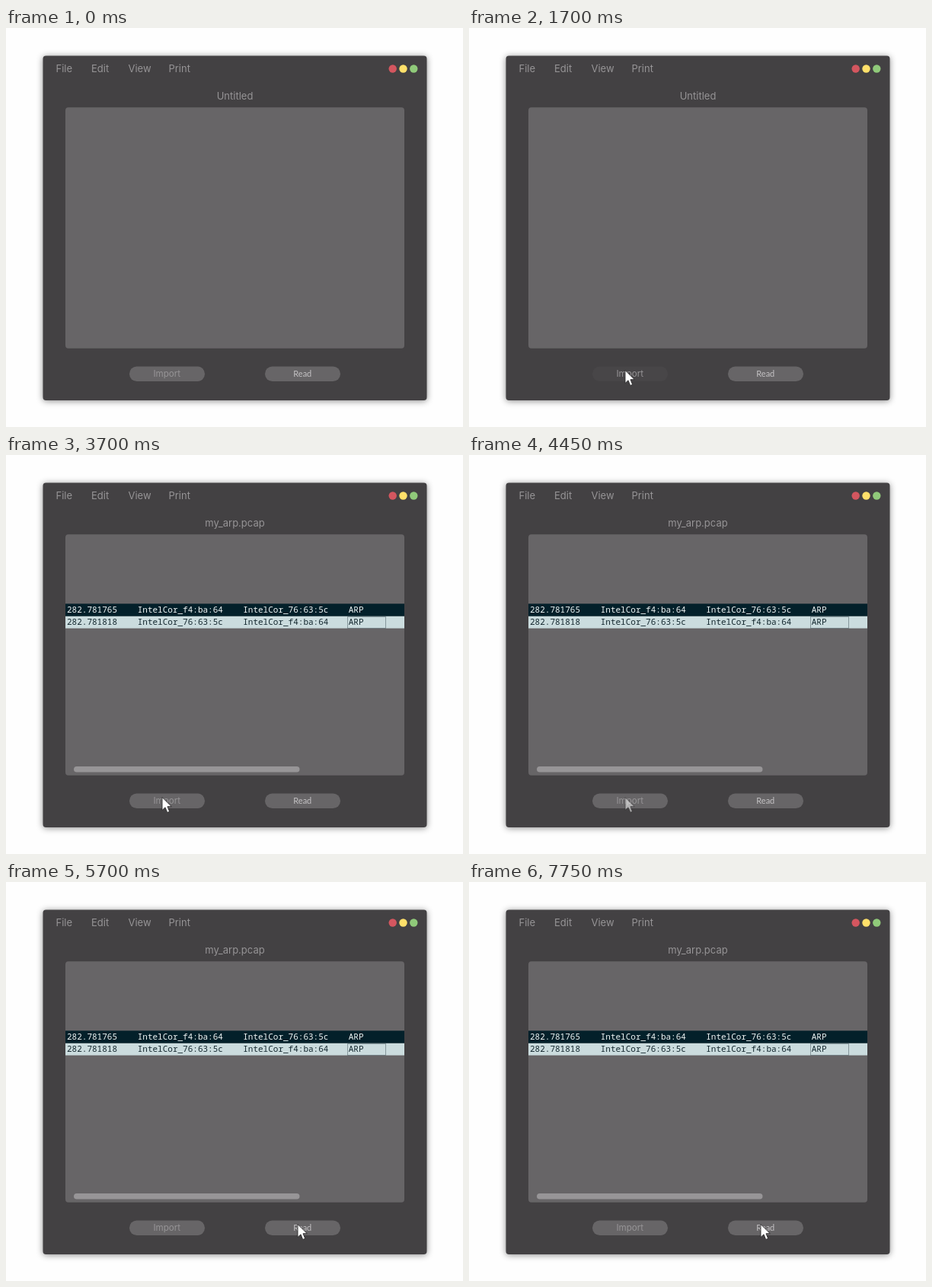
An HTML page for the animation above (8000 ms loop, 600 by 524 pixels).

```html
<!DOCTYPE html>
<html lang="en">
<head>
<meta charset="utf-8">
<style>
  html, body { margin: 0; width: 100%; height: 100%; overflow: hidden; background: #fefefe; }
  svg { display: block; width: 600px; height: 524px; }
  text { font: 13px Inter, sans-serif; fill: #969496; }
  .mid { text-anchor: middle; }
  .panel { fill: #676567; }
  .pressed { fill: #484648; }
  .row text { font: 11px "Noto Sans Mono", monospace; fill: inherit; }
  #window { filter: drop-shadow(0 1px 4px rgba(0, 0, 0, .45)); }
</style>
</head>
<body>
<svg viewBox="0 0 600 524">
  <rect id="window" x="48.5" y="36.5" width="504" height="452.5" rx="4" fill="#434143"/>
  <text x="65.5" y="57.5">File</text>
  <text x="112" y="57.5">Edit</text>
  <text x="160.5" y="57.5">View</text>
  <text x="213.5" y="57.5">Print</text>
  <circle cx="507.7" cy="53.5" r="5.2" fill="#d4565f"/>
  <circle cx="521.5" cy="53.5" r="5.2" fill="#ffe06a"/>
  <circle cx="535.3" cy="53.5" r="5.2" fill="#90ca7a"/>
  <text id="title" class="mid" x="300.5" y="94.3"></text>
  <rect class="panel" x="78" y="104.3" width="445" height="316.5" rx="4"/>

  <g id="capture">
    <g class="row" fill="#f2f6f6">
      <rect x="78" y="195.3" width="445" height="16.5" fill="#03202a"/>
      <text x="80" y="206.6">282.781765</text>
      <text x="172.7" y="206.6">IntelCor_f4:ba:64</text>
      <text x="311.2" y="206.6">IntelCor_76:63:5c</text>
      <text x="449.7" y="206.6">ARP</text>
    </g>
    <g class="row" fill="#14282f">
      <rect x="78" y="211.8" width="445" height="15.8" fill="#cbdcde"/>
      <text x="80" y="223">282.781818</text>
      <text x="172.7" y="223">IntelCor_76:63:5c</text>
      <text x="311.2" y="223">IntelCor_f4:ba:64</text>
      <text x="449.7" y="223">ARP</text>
      <rect x="448.5" y="212.5" width="50" height="15" fill="none" stroke="#43555b" stroke-dasharray="1 1"/>
    </g>
    <rect x="89" y="409" width="296.5" height="7.6" rx="3.8" fill="#979597"/>
  </g>

  <rect id="import" x="162" y="444.5" width="99" height="19.5" rx="9.75"/>
  <text class="mid" x="211.3" y="458" style="font-size:11.6px">Import</text>
  <rect id="read" x="340" y="444.5" width="99" height="19.5" rx="9.75"/>
  <text class="mid" x="389.3" y="457.8" style="font:11px Lato, sans-serif;fill:#c4c2c4">Read</text>

  <path id="cursor" d="M0 0V17L4 13.3L6.7 20L9.7 18.8L7 12.2H12.3Z" fill="#fff" stroke="#2a292a" stroke-width=".9" stroke-linejoin="round"/>
</svg>
<script>
  const LOOP = 8000, STEP = 50;
  const $ = id => document.getElementById(id);
  const clamp = v => Math.min(1, Math.max(0, v));
  const press = (id, on) => $(id).setAttribute('class', on ? 'pressed' : 'panel');

  function draw(t) {
    const loaded = t >= 3700;
    $('title').textContent = loaded ? 'my_arp.pcap' : 'Untitled';
    $('capture').style.display = loaded ? '' : 'none';
    press('import', t >= 1700 && t < 2700);
    press('read', t >= 6700 && t < 7750);

    // The pointer flies in below Import, fades out, then flies in below Read.
    const second = t >= 5550;
    const start = second ? 5550 : 550;
    const y = 520 - 70.5 * clamp((t - start) / 150);
    const opacity = t < 550 ? 0 : second ? 1 : 1 - clamp((t - 4200) / 500);
    $('cursor').setAttribute('transform', `translate(${second ? 383 : 205} ${y})`);
    $('cursor').setAttribute('opacity', opacity);
  }

  const begin = performance.now();
  function tick() {
    const t = (performance.now() - begin) % LOOP;
    draw(Math.floor(t / STEP) * STEP);
    requestAnimationFrame(tick);
  }
  tick();
</script>
</body>
</html>
```
